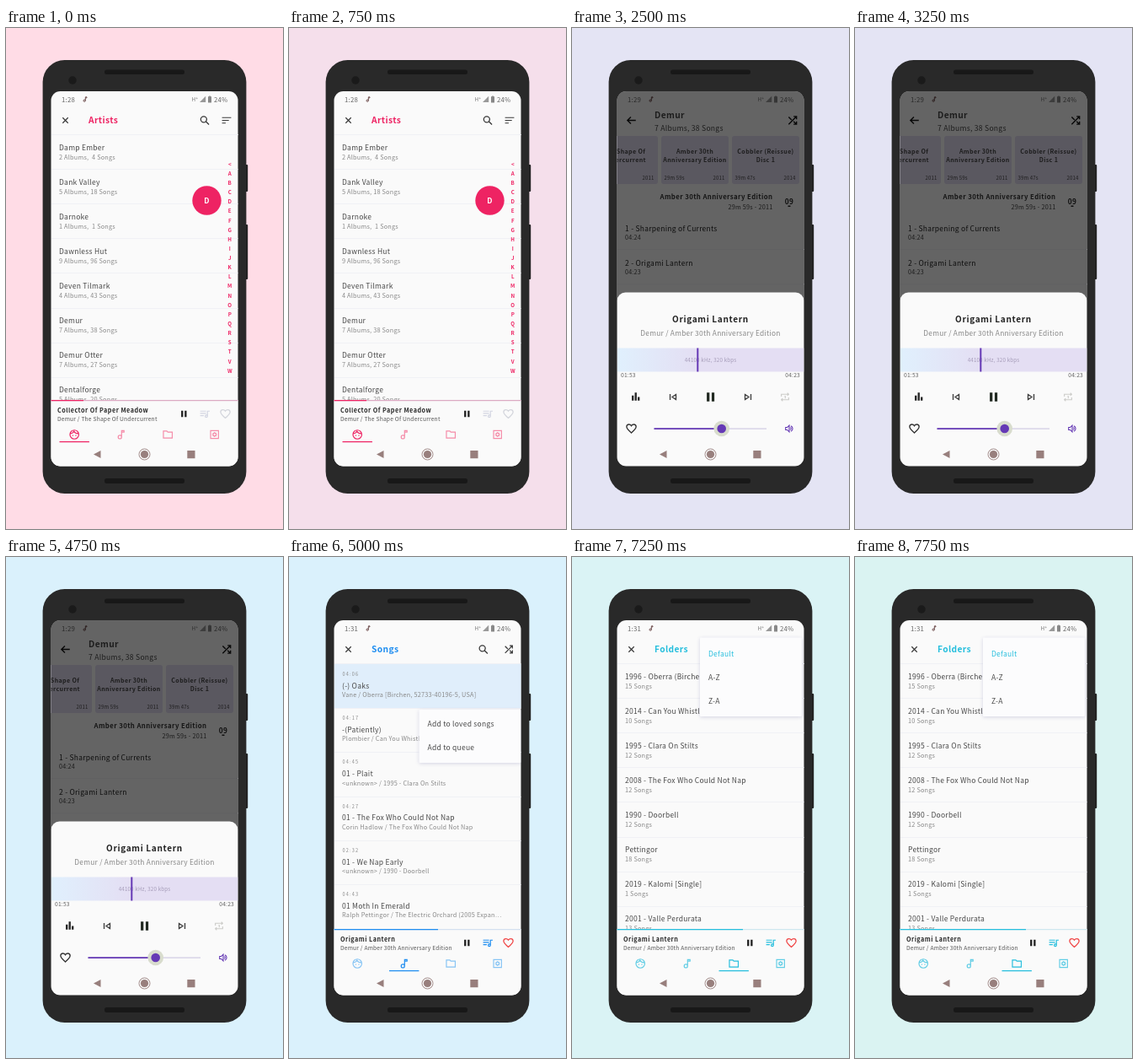
Animation, 329 px wide and 594 px high, one loop 8 s. Source, as an HTML page with a canvas:

```html
<!DOCTYPE html>
<html lang="en">
<head>
<meta charset="utf-8">
<title>Music player</title>
<style>
html, body { margin: 0; width: 100%; height: 100%; overflow: hidden; background: #ffdce6; }
canvas { display: block; width: 329px; height: 594px; }
</style>
</head>
<body>
<canvas id="stage"></canvas>
<script>
const W = 329, H = 594, LOOP = 8000, STEP = 250;
const FONT = '"Noto Sans CJK JP", "Noto Sans CJK SC", "Noto Sans CJK", "Open Sans", sans-serif';
const INK = '#484848', SOFT = '#888', LINE = '#f0f1f5', PAPER = '#fafafa';
const PINK = '#ee2363', PURPLE = '#6539b5', BLUE = '#1e8df0', CYAN = '#25bedd';

const canvas = document.getElementById('stage');
const ctx = canvas.getContext('2d');
const ratio = window.devicePixelRatio || 1;
canvas.width = W * ratio;
canvas.height = H * ratio;

const backdrop = [
  [0, [255, 220, 230]], [2000, [228, 228, 244]], [3250, [228, 228, 244]],
  [4750, [218, 241, 252]], [6000, [218, 243, 251]], [LOOP, [218, 243, 241]]
];

// Icons live on a 24-unit grid and are stroked unless listed as solid.
const icons = {
  close: 'M5 5L19 19M19 5L5 19',
  back: 'M21 12H4M11 5L4 12L11 19',
  search: 'M16 9.5a6.5 6.5 0 1 1-13 0a6.5 6.5 0 1 1 13 0M14.5 14.5L21 21',
  sort: 'M2 6H22M2 12H17M2 18H10',
  shuffle: 'M4 5L10 11M14 14L20 20M4 20L20 4M14 4H20V10M14 20H20V14',
  note: 'M13 17V4H18V7H13M13 17a3.5 3.5 0 1 1-7 0a3.5 3.5 0 1 1 7 0',
  face: 'M21 12a9 9 0 1 1-18 0a9 9 0 1 1 18 0M4 10C8 10 10 8 11 5C13 9 16 10 20 10M9 13V15M15 13V15',
  folder: 'M3 5H10L12 7H21V19H3Z',
  settings: 'M4 4H20V20H4ZM15 12a3 3 0 1 1-6 0a3 3 0 1 1 6 0M12 7V9M12 15V17M7 12H9M15 12H17M8.5 8.5L10 10M14 14L15.5 15.5M15.5 8.5L14 10M10 14L8.5 15.5',
  heart: 'M12 20C5 14 3 11.5 3 8.5C3 6 5 4 7.5 4C9.3 4 11 5 12 6.6C13 5 14.7 4 16.5 4C19 4 21 6 21 8.5C21 11.5 19 14 12 20Z',
  queue: 'M2 6H15M2 11H15M2 16H10M18 17V6H23M18 17a2.5 2.5 0 1 1-5 0a2.5 2.5 0 1 1 5 0',
  repeat: 'M4 11V6H20M17 3L20 6L17 9M20 13V18H4M7 15L4 18L7 21M11 10H12.5V15',
  speaker: 'M3 9H7L12 4V20L7 15H3ZM15 9C17 10 17 14 15 15M16 5C22 8 22 16 16 19',
  previous: 'M5 5V19M19 6L10 12L19 18Z',
  next: 'M19 5V19M5 6L14 12L5 18Z',
  chart: 'M4 10H8V20H4ZM10 4H14V20H10ZM16 13H20V20H16Z',
  pause: 'M5 4H10V20H5ZM14 4H19V20H14Z',
  signal: 'M2 21H21V2Z',
  battery: 'M7 4H10V2H14V4H17V22H7Z'
};
const solid = new Set(['chart', 'pause', 'signal', 'battery']);
for (const name in icons) icons[name] = new Path2D(icons[name]);

function icon(name, x, y, size, color, weight = 2) {
  ctx.save();
  ctx.translate(x - size / 2, y - size / 2);
  ctx.scale(size / 24, size / 24);
  ctx.fillStyle = ctx.strokeStyle = color;
  ctx.lineWidth = weight;
  if (solid.has(name)) ctx.fill(icons[name]);
  else ctx.stroke(icons[name]);
  ctx.restore();
}

function text(str, x, y, size, color = INK, { bold = false, align = 'left', spacing = size * 0.03 } = {}) {
  ctx.font = `${bold ? 700 : 400} ${size}px ${FONT}`;
  ctx.letterSpacing = spacing + 'px';
  ctx.textAlign = align;
  ctx.fillStyle = color;
  ctx.fillText(str, x, y);
}

function box(x, y, w, h, color, radius = 0) {
  ctx.fillStyle = color;
  ctx.beginPath();
  ctx.roundRect(x, y, w, h, radius);
  ctx.fill();
}

function disc(x, y, r, color) {
  ctx.fillStyle = color;
  ctx.beginPath();
  ctx.arc(x, y, r, 0, Math.PI * 2);
  ctx.fill();
}

const rule = y => box(54, y, 222, 1, LINE);

function phone() {
  box(284, 162, 3.2, 32, '#202020', 1);
  box(284, 233, 3.2, 65, '#202020', 1);
  box(43.6, 38.1, 241.8, 513.8, '#292929', 26);
  box(117, 49.5, 95, 5.5, '#181818', 2.5);
  box(117, 534, 95, 6, '#181818', 2.5);
  disc(79, 62, 4.7, '#1a1a1a');
}

function statusBar(time) {
  text(time, 66, 87.8, 7.8, '#666');
  icon('note', 94, 84.5, 8, '#705050', 3);
  text('H', 220.5, 87, 6.3, '#777');
  text('+', 225.3, 84.7, 5, '#777');
  icon('signal', 233.8, 84.6, 9, '#999');
  icon('battery', 242, 84.5, 9.5, '#888');
  text('24%', 247, 87.8, 7.8, '#666');
}

function header(title, color) {
  icon('close', 70.5, 109.5, 11, '#383838', 2.6);
  text(title, 98, 113, 10.2, color, { bold: true, spacing: 0.4 });
  rule(126);
}

function navBar() {
  const tone = '#987f7d';
  ctx.fillStyle = tone;
  ctx.beginPath();
  ctx.moveTo(104, 505.5);
  ctx.lineTo(112.5, 501);
  ctx.lineTo(112.5, 510);
  ctx.fill();
  disc(164.5, 505.5, 4.6, tone);
  ctx.strokeStyle = tone;
  ctx.lineWidth = 0.9;
  ctx.beginPath();
  ctx.arc(164.5, 505.5, 6.5, 0, Math.PI * 2);
  ctx.stroke();
  box(215.3, 501, 9.2, 9.2, tone);
}

function miniPlayer({ title, sub, color, pale, track, progress, tab, loved }) {
  box(53, 441, 223, 79, PAPER);
  box(53, 441, 223, 1.2, track);
  box(53, 441, progress - 53, 1.2, color);
  text(title, 61, 455.5, 7.2, '#252525', { bold: true, spacing: 0.5 });
  text(sub, 61, 465.8, 6.7, '#555');
  icon('pause', 211.3, 457.5, 11, '#202020');
  icon('queue', 236, 457.5, 13, loved ? color : '#d3d5e2', 2.2);
  icon('heart', 260.5, 457.5, 15, loved ? '#f04444' : '#d3d5dc', 2);
  ['face', 'note', 'folder', 'settings'].forEach((name, i) => {
    const x = 81.2 + i * 55.5;
    icon(name, x, 482, 14, i === tab ? color : pale, 2);
    if (i === tab) box(x - 17.7, 490, 35.4, 1.2, color);
  });
  navBar();
}

function listRows(rows) {
  rows.forEach(([name, sub], i) => {
    const y = 126 + i * 41.1;
    rule(Math.round(y));
    text(name, 63, y + 18.5, 8.5);
    text(sub, 63, y + 29.6, 7.3, SOFT);
  });
}

function menu(x, y, w, h, items, accent) {
  ctx.save();
  ctx.shadowColor = 'rgba(80, 80, 150, .22)';
  ctx.shadowBlur = 4 * ratio;
  ctx.shadowOffsetY = ratio;
  box(x, y, w, h, '#fcfcfd', 1);
  ctx.restore();
  items.forEach((item, i) =>
    text(item, x + 10, y + (accent ? 22.3 : 19.5) + i * 28, 8.5, accent && !i ? accent : INK));
}

const artists = [
  ['Damp Ember', '2 Albums,  4 Songs'], ['Dank Valley', '5 Albums, 18 Songs'],
  ['Darnoke', '1 Albums,  1 Songs'], ['Dawnless Hut', '9 Albums, 96 Songs'],
  ['Deven Tilmark', '4 Albums, 43 Songs'], ['Demur', '7 Albums, 38 Songs'],
  ['Demur Otter', '7 Albums, 27 Songs'], ['Dentalforge', '5 Albums, 20 Songs']
];

const songs = [
  ['04:06', '(-) Oaks', 'Vane / Oberra [Birchen, 52733-40196-5, USA]'],
  ['04:17', '-(Patiently)', 'Plombier / Can You Whistle'],
  ['04:45', '01 - Plait', '<unknown> / 1995 - Clara On Stilts'],
  ['04:27', '01 - The Fox Who Could Not Nap', 'Corin Hadlow / The Fox Who Could Not Nap'],
  ['02:32', '01 - We Nap Early', '<unknown> / 1990 - Doorbell'],
  ['04:43', '01 Moth In Emerald', 'Ralph Pettingor / The Electric Orchard (2005 Expan…']
];

const folders = [
  ['1996 - Oberra (Birchen)', '15 Songs'], ['2014 - Can You Whistle', '10 Songs'],
  ['1995 - Clara On Stilts', '12 Songs'], ['2008 - The Fox Who Could Not Nap', '12 Songs'],
  ['1990 - Doorbell', '12 Songs'], ['Pettingor', '18 Songs'],
  ['2019 - Kalomi [Single]', '1 Songs'], ['2001 - Valle Perdurata', '13 Songs']
];

const nowPlaying = { title: 'Origami Lantern', sub: 'Demur / Amber 30th Anniversary Edition', loved: true };

function artistScreen() {
  statusBar('1:28');
  header('Artists', PINK);
  icon('search', 236.2, 109.7, 13, '#383838', 2.4);
  icon('sort', 262, 109.5, 13, '#383838', 2.2);
  listRows(artists);
  [...'<ABCDEFGHIJKLMNOPQRSTVW'].forEach((letter, i) =>
    text(letter, 265.8, 163.8 + i * 11.13, 6.2, PINK, { bold: true, align: 'center' }));
  disc(238.5, 204.5, 17.2, PINK);
  text('D', 238.5, 207.8, 8.7, '#fff', { bold: true, align: 'center' });
  miniPlayer({
    title: 'Collector Of Paper Meadow', sub: 'Demur / The Shape Of Undercurrent',
    color: PINK, pale: '#f58ba8', track: '#dcaac3', progress: 92, tab: 0
  });
}

function albumCard(x, lines, length, year) {
  box(x, 128, 80, 57, '#e2dcf2', 3);
  lines.forEach((line, i) =>
    text(line, x + 40, 149 + i * 10.3, 7.1, INK, { bold: true, align: 'center', spacing: 0.35 }));
  text(length, x + 3.5, 180.3, 6, INK);
  text(year, x + 75.5, 180.3, 6, INK, { align: 'right' });
}

function albumPage() {
  statusBar('1:29');
  icon('back', 70.5, 109.5, 14, '#151515', 2.4);
  text('Demur', 98, 107.3, 10.2, INK, { bold: true, spacing: 0.4 });
  text('7 Albums, 38 Songs', 98, 121.5, 8.6, INK);
  icon('shuffle', 262, 109.5, 14, '#151515', 2.4);
  albumCard(22, ['The Shape Of', 'Undercurrent'], '56m 48s', '2011');
  albumCard(106, ['Amber 30th', 'Anniversary Edition'], '29m 59s', '2011');
  albumCard(190, ['Cobbler (Reissue)', 'Disc 1'], '39m 47s', '2014');
  text('Amber 30th Anniversary Edition', 238.5, 203.2, 7.8, '#333', { bold: true, align: 'right', spacing: 0.4 });
  text('29m 59s - 2011', 238.5, 214.8, 7.3, '#444', { align: 'right' });
  text('09', 258, 208.8, 8.3, '#222', { bold: true, align: 'center' });
  box(256.5, 210.5, 3, 1.5, '#222');
  [['1 - Sharpening of Currents', '04:24'], ['2 - Origami Lantern', '04:23']].forEach(([name, time], i) => {
    const y = 241 + i * 41.2;
    text(name, 63, y, 8.5, '#222');
    text(time, 63, y + 10.2, 7.1, '#444');
    rule(y + 21);
  });
}

function playerSheet() {
  const center = { align: 'center' };
  box(53.5, 313.5, 222, 206, PAPER, 10);
  text('Origami Lantern', 164.5, 348.5, 10, '#222', { bold: true, align: 'center', spacing: 0.7 });
  text(nowPlaying.sub, 164.5, 364.8, 8.4, SOFT, center);
  const wash = ctx.createLinearGradient(54, 0, 150, 0);
  wash.addColorStop(0, '#e0f0fd');
  wash.addColorStop(1, '#e4def3');
  box(54, 379.5, 221.5, 28, wash);
  text('44100 kHz, 320 kbps', 164.5, 395.8, 6.2, '#a59bb8', center);
  box(148.3, 379.5, 2, 28, PURPLE);
  text('01:53', 58, 414.3, 6.7, '#606060');
  text('04:23', 271, 414.3, 6.7, '#606060', { align: 'right' });
  icon('chart', 75.7, 437, 14, '#252525');
  icon('previous', 120, 437.5, 12, '#353535', 2.5);
  icon('pause', 164.6, 437.5, 15.5, '#202820');
  icon('next', 209, 437.5, 12, '#353535', 2.5);
  icon('repeat', 253, 437.5, 13, '#cbcbc8', 2);
  icon('heart', 70.5, 475, 15, '#333', 2.2);
  box(97.5, 474.3, 133.5, 1.6, '#dcd9ea');
  box(97.5, 474.2, 80, 1.8, PURPLE);
  disc(177.7, 475, 9.3, '#d8dccd');
  disc(177.7, 475, 5.3, PURPLE);
  icon('speaker', 258, 475, 11.5, PURPLE, 2.3);
  navBar();
}

function playerScreen() {
  albumPage();
  box(53, 74, 223, 446, 'rgba(0, 0, 0, .6)');
  playerSheet();
}

function songScreen() {
  statusBar('1:31');
  header('Songs', BLUE);
  icon('search', 231, 109.7, 13, '#383838', 2.4);
  icon('shuffle', 261, 109.5, 13, '#383838', 2.2);
  box(54, 127, 222, 52, '#e0eefb');
  songs.forEach(([time, name, sub], i) => {
    const y = 127 + i * 52.2;
    if (i) rule(Math.round(y));
    text(time, 63.5, y + 14, 5.5, SOFT, { spacing: 1.2 });
    text(name, 63, y + 28.7, 8.5);
    text(sub, 63, y + 39.2, 7.3, SOFT);
  });
  menu(154.5, 181, 121, 63, ['Add to loved songs', 'Add to queue']);
  miniPlayer({ ...nowPlaying, color: BLUE, pale: '#86c4f4', track: '#d3e0f0', progress: 177, tab: 1 });
}

function folderScreen() {
  statusBar('1:31');
  header('Folders', CYAN);
  listRows(folders);
  menu(152, 95.5, 121, 93.5, ['Default', 'A-Z', 'Z-A'], CYAN);
  miniPlayer({ ...nowPlaying, color: CYAN, pale: '#62cde5', track: '#cee7ee', progress: 203, tab: 2 });
}

const screens = [[7250, folderScreen], [5000, songScreen], [2500, playerScreen], [0, artistScreen]];

function backdropAt(t) {
  const next = Math.max(1, backdrop.findIndex(([at]) => at > t));
  const [t0, from] = backdrop[next - 1], [t1, to] = backdrop[next];
  const mix = (t - t0) / (t1 - t0);
  return `rgb(${from.map((v, i) => Math.round(v + (to[i] - v) * mix)).join()})`;
}

function draw(t) {
  ctx.setTransform(ratio, 0, 0, ratio, 0, 0);
  box(0, 0, W, H, backdropAt(t));
  phone();
  ctx.save();
  ctx.beginPath();
  ctx.roundRect(53.5, 75, 222, 444.5, 11);
  ctx.clip();
  box(53, 74, 223, 446, PAPER);
  screens.find(([at]) => t >= at)[1]();
  ctx.restore();
}

const start = performance.now();
function tick() {
  const t = (performance.now() - start) % LOOP;
  draw(Math.floor(t / STEP) * STEP);
  requestAnimationFrame(tick);
}
tick();
</script>
</body>
</html>
```
